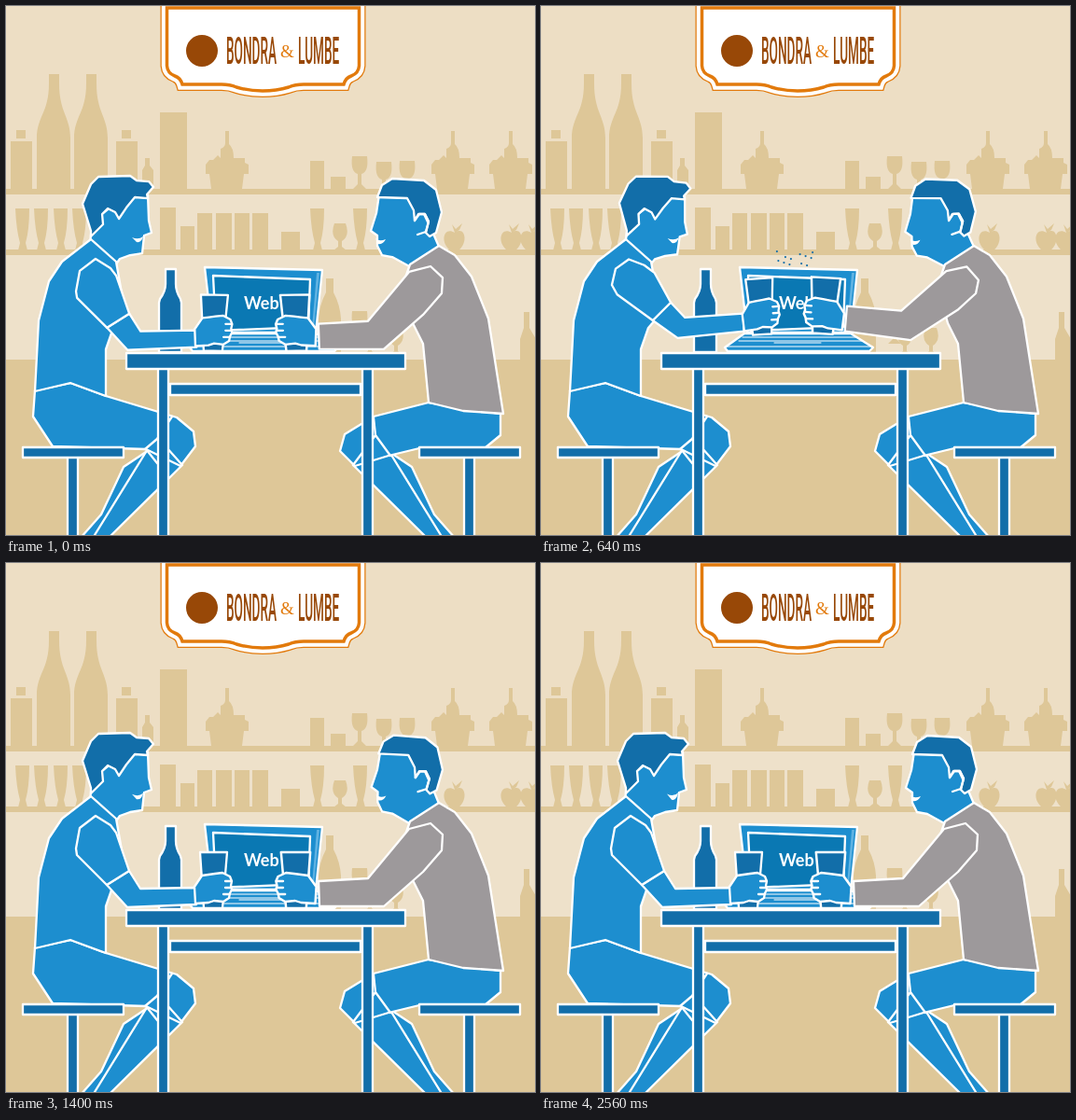
Recreate the animation shown at these times as an HTML page. Size 567 by 567 pixels, loop 2.6 s.

```html
<!DOCTYPE html>
<html lang="es">
<head>
<meta charset="utf-8">
<style>
html, body { margin: 0; width: 100%; height: 100%; overflow: hidden; background: #dcc596; }
svg { display: block; width: 567px; height: 567px; }
.tan { fill: #dec798; }
.fig { stroke: #fff; stroke-width: 2.3; stroke-linejoin: round; stroke-linecap: round; }
.skin { fill: #1d8ecf; }
.dark { fill: #126ea9; }
.gray { fill: #9d999b; }
.line { fill: none; }
.sign { font: 500 40px Roboto, sans-serif; fill: #984807; }
</style>
</head>
<body>
<svg viewBox="0 0 567 567">
  <defs>
    <path id="bigBottle" d="M46 73H57V83C57 115 69 118 69 142V196H33V142C33 118 46 115 46 83Z"/>
    <path id="pint" d="M10 217H25Q25 240 21 254L23 262H13L15 254Q11 240 10 217Z"/>
    <path id="carton" d="M5 145H28V196H5ZM11 133H21V142H11Z"/>
    <path id="wine" d="M371 161H387Q389 178 381 180V191L386 196H372L377 191V180Q369 178 371 161Z"/>
    <path id="bucket" d="M235 134H239V148Q244 152 244 163H256V168L260 170V180H255L253 196H220L218 180H214V170L218 165H222L227 160 230 163V153Q235 151 235 147Z"/>
    <path id="goblet" d="M352 233H364Q369 246 360 252V258L365 262H351L356 258V252Q347 246 352 233Z"/>
    <path id="apple" d="M481 243C492 235 496 253 485 262H476C464 252 470 236 481 243L478 234 482 239 489 233 486 240Z"/>
    <path id="badge" d="M172.500 2V64Q173 72 181 75Q187 77 189 84H231Q240 84 247 87Q260 91 275 91Q290 91 303 87Q310 84 319 84H362Q364 77 370 75Q378 72 378.500 64V2Z"/>
    <g id="fist" class="fig">
      <path class="dark" d="M-14-37H15L10 23H-10Z"/>
      <path class="skin" d="M-20 0 -12-12-5-13 2-14 10-15 18-11 20-6 19-1 20 3 18 7 17 12 11 16 1 15-5 17-19 18Z"/>
      <path class="line" d="M13-6 19-6M13 1 19 1M11 8 17 8"/>
    </g>
    <g id="stool" class="fig dark"><path d="M66 480H77V575H66Z"/><path d="M18 473H126V484H18Z"/></g>
    <g id="shins" class="fig skin">
      <path d="M126 494 150 478 163 462 189 492 110 570H80L102 545Z"/>
      <path class="line" d="M150 478 95 567"/>
    </g>
  </defs>

  <path fill="#eddec4" d="M0 0H567V379H0Z"/>
  <path fill="#eee1ca" d="M0 202H567V379H0Z"/>
  <g class="tan">
    <path d="M0 196H567V202H0ZM0 261H567V267H0Z"/>
    <path d="M165 114H194V196H165ZM326 166H341V196H326ZM348 183H364V196H348ZM146 196V176L149 171V163H154V171L158 176V196Z"/>
    <path d="M165 216H182V262H165ZM187 236H202V262H187ZM205 222H221V262H205ZM225 222H242V262H225ZM245 222H261V262H245ZM264 222H281V262H264ZM295 242H315V262H295Z"/>
    <path d="M343 292H351V307Q358 320 359 335V379H335V335Q336 320 343 307ZM555 328H561V345L568 357V379H551V357L555 345Z"/>
    <use href="#bigBottle"/><use href="#bigBottle" x="40"/>
    <use href="#carton"/><use href="#carton" x="113"/>
    <use href="#bucket"/><use href="#bucket" x="242"/><use href="#bucket" x="304"/>
    <use href="#wine"/><use href="#wine" x="26" y="6"/><use href="#wine" x="51" y="5"/><use href="#wine" y="166"/>
    <use href="#pint"/><use href="#pint" x="20"/><use href="#pint" x="41"/><use href="#pint" x="61"/>
    <use href="#pint" x="316"/><use href="#pint" x="362"/>
    <use href="#goblet"/><use href="#goblet" x="32" y="112"/><use href="#goblet" x="60" y="112"/>
    <use href="#apple"/><use href="#apple" x="61"/><use href="#apple" x="82"/>
    <path d="M0 379H567V567H0Z"/>
  </g>

  <use href="#badge" fill="#fff" stroke="#e27a0c" stroke-width="14"/>
  <use href="#badge" fill="#fff" stroke="#fff" stroke-width="11.500"/>
  <use href="#badge" fill="#fff" stroke="#e27a0c" stroke-width="3.500"/>
  <circle cx="210" cy="48" r="17" fill="#984807"/>
  <text class="sign" transform="translate(236 62) scale(.34 1)">BONDRA</text>
  <text class="sign" transform="translate(313 62) scale(.34 1)">LUMBE</text>
  <text x="294" y="55" font-family="Liberation Serif, serif" font-size="19" fill="#e27a0c">&amp;</text>

  <g class="fig">
    <path class="dark" d="M171 282H182V298Q182 306 187 314L188 318V371H164V318L165 314Q171 306 171 298Z"/>
    <path class="skin" d="M213 280 339 283 332 350 221 350Z"/>
    <path fill="#0a78b3" d="M222 289 326 293 324 344 225 348Z"/>
    <path class="skin" d="M218 351H332L356 366 352 370H200L197 366Z"/>
    <path class="line" stroke-width="1" d="M216 355H338M212 359H344M198 365H355M250 361H300"/>
  </g>
  <path fill="#5fb2e2" d="M333 286H336L330 345H328Z"/>
  <text x="255" y="325" font-family="Lato, sans-serif" font-weight="700" font-size="18" fill="#fff">Web</text>

  <g id="headL" class="fig">
    <path class="skin" d="M92 235 104 222 125 205 152 203 153 230 156 243 148 246 146 265 133 267 122 271 112 285 90 255Z"/>
    <path class="dark" d="M91 247 91 241 82 212 91 191 99 183 133 182 140 187 153 188 158 194 151 202 152 206 138 205 129 216 121 228 117 221 109 217 103 223 104 234Z"/>
    <path id="mouthL" fill="#fff" stroke="none" d="M135 248Q142 251 147 247Q145 254 140 253Z"/>
  </g>
  <g id="headR" class="fig">
    <path class="skin" d="M400 202 397 222 391 241 398 246 398 257 403 267 414 269 434 280 464 258 458 244 440 206Z"/>
    <path class="dark" d="M398 205 403 192 414 185 448 187 461 197 467 221 461 243 454 247 450 243 453 231 449 223 442 223 438 230 437 219 430 206Z"/>
    <path class="line" d="M438 230 443 223 449 223 453 231 450 242 441 245"/>
    <path fill="#fff" stroke="none" d="M396 249Q400 253 407 250Q404 256 399 255Z"/>
  </g>

  <use href="#shins"/>
  <use href="#shins" transform="translate(561) scale(-1 1)"/>
  <g class="fig skin">
    <path d="M31 412 69 404 107 418 183 441 201 456 203 472 187 493 150 475 50 472 29 440Z"/>
    <path class="line" d="M178 440 162 464 149 475M163 463 188 491M150 475 162 490"/>
    <path d="M91 250 60 274 46 295 35 337 31 413 69 404 107 418 107 368 115 345 128 330 118 274Z"/>
    <path d="M453 425 394 440 363 459 358 477 374 493 410 482 443 474H513L530 460V437Z"/>
    <path class="line" d="M394 441 396 460 412 482M396 460 372 492"/>
  </g>
  <path class="fig gray" d="M464 257 481 267 499 290 517 335 533 437 490 434 453 425 447 362 436 340 425 300 433 277Z"/>

  <g class="fig dark">
    <path d="M163 380H174V575H163ZM382 380H393V575H382ZM176 405H380V417H176Z"/>
    <path d="M129 372H428V389H129Z"/>
  </g>
  <use href="#stool"/><use href="#stool" x="425"/>

  <g id="splash"></g>
  <g class="fig">
    <polygon id="foreL" class="skin"/>
    <polygon id="sleeveL" class="skin"/>
    <use id="fistL" href="#fist"/>
    <use id="fistR" href="#fist"/>
    <polygon id="armR" class="gray"/>
  </g>
</svg>
<script>
const el = id => document.getElementById(id);
const clamp = x => Math.min(1, Math.max(0, x));
const ramp = (t, from, to) => clamp((t - from) / (to - from));
const smooth = u => u * u * (3 - 2 * u);
const mix = (a, b, p) => a + (b - a) * p;

// Each limb has a resting outline and a raised one.
const limbs = {
  sleeveL: [[96,271, 112,281, 118,289, 132,330, 108,345, 76,313, 75,306, 79,284],
            [92,272, 109,274, 126,283, 147,304, 133,328, 88,305, 77,291, 81,279]],
  foreL: [[132,330, 144,349, 204,348, 204,366, 130,369, 108,345],
          [147,304, 166,317, 231,309, 233,329, 165,341, 133,328]],
  armR: [[432,285, 455,279, 468,291, 467,308, 447,331, 405,368, 336,368, 335,341, 388,338],
         [437,283, 458,280, 470,297, 465,308, 446,320, 386,347, 314,327, 320,300, 384,314]]
};

const drops = Array.from({ length: 12 }, (_, i) => {
  const dot = document.createElementNS("http://www.w3.org/2000/svg", "circle");
  dot.setAttribute("r", 1.1);
  el("splash").append(dot);
  return { dot, side: i % 2 ? 1 : -1, dx: i * 37 % 13 - 6, dy: i * 23 % 16 - 8 };
});

function draw(t) {
  const lift = t < 440 ? smooth(ramp(t, -20, 340)) : (1 - ramp(t, 440, 1080)) ** 2;
  const lean = smooth(ramp(t, 1140, 1680)) - smooth(ramp(t, 1700, 2220));
  const tilt = t < 200 ? mix(1, 8, smooth(t / 200))
    : t < 440 ? mix(8, -8, smooth(ramp(t, 220, 400))) : -8 * lift;

  for (const [id, [rest, raised]] of Object.entries(limbs))
    el(id).setAttribute("points", rest.map((v, i) => mix(v, raised[i], lift).toFixed(2)).join(" "));

  const place = (id, value) => el(id).setAttribute("transform", value);
  place("fistL", `translate(${222 + 29 * lift} ${347 - 38 * lift}) rotate(${tilt})`);
  place("fistR", `translate(${311 - 16 * lift} ${347 - 40 * lift}) scale(-1.08 1) rotate(${tilt})`);
  place("headL", `rotate(${4 * lift} 108 268)`);
  place("headR", `rotate(${2.3 * lean - 2.7 * lift} 436 272)`);

  const talk = t > 1160 ? Math.abs(Math.sin((t - 1160) * Math.PI / 260)) : 0;
  place("mouthL", `translate(0 ${-75 * talk}) scale(1 ${1 + 0.3 * talk})`);

  const u = (t - 280) / 400;
  el("splash").setAttribute("opacity", u < 0 ? 0 : clamp((1.15 - u) * 4));
  el("splash").setAttribute("fill", u < 0.65 ? "#1d8ecf" : "#126ea9");
  for (const { dot, side, dx, dy } of drops) {
    dot.setAttribute("cx", 272 + side * (11 - u) + dx * (0.6 + u));
    dot.setAttribute("cy", 275 + dy - 75 * u * (0.96 - u));
  }
}

(function frame() {
  draw(performance.now() % 2600);
  requestAnimationFrame(frame);
})();
</script>
</body>
</html>
```
